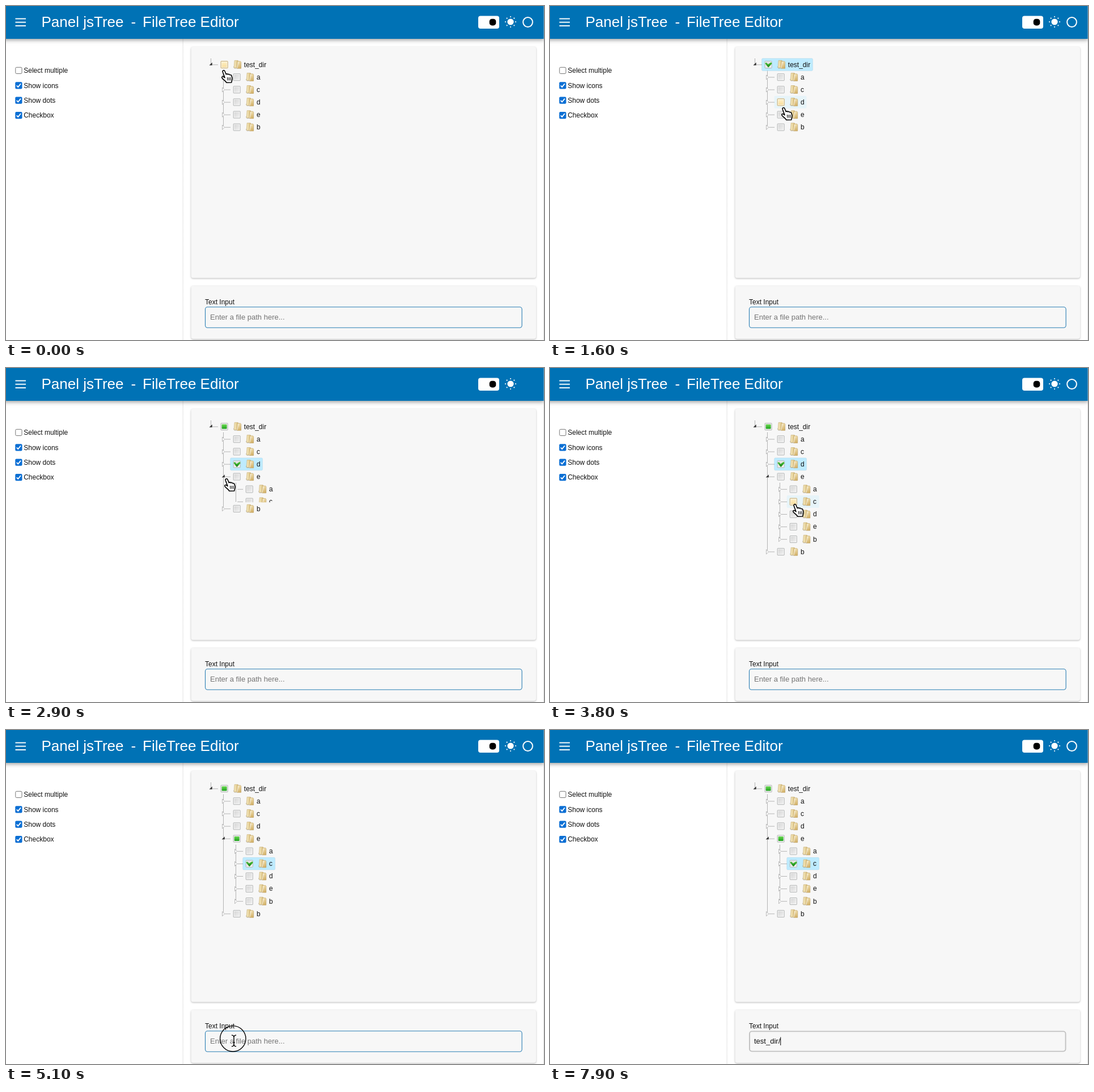
These frames come from a looping animation (949x590 px, 8000 ms). An HTML page with a canvas:

```html
<!DOCTYPE html>
<html lang="en">
<head>
<meta charset="utf-8">
<title>Panel jsTree - FileTree Editor</title>
<style>
html, body { margin: 0; width: 949px; height: 590px; overflow: hidden; background: #fff; }
canvas { display: block; }
</style>
</head>
<body>
<canvas id="stage" width="949" height="590"></canvas>
<script>
const ctx = document.getElementById('stage').getContext('2d');
const LOOP = 8000, STEP = 100, ROW = 22.1;
const FONT = '"Liberation Sans", Arial, sans-serif';

// pointer way points: time, x, y of the cursor's middle
const PATH = [
  [0, 390, 124], [600, 390, 124], [900, 420, 196], [1100, 418, 190],
  [2000, 418, 190], [2400, 395, 206], [3200, 395, 206], [3600, 438, 251],
  [4200, 438, 251], [4500, 424, 485], [4800, 402, 549], [5700, 402, 549]
];
const CLICKS = [300, 1700, 2600, 3900];
const BUSY = [[500, 700], [1800, 2100], [2800, 3200], [4000, 4300], [5200, 5400]];
const KEYS = [5700, 5900, 6100, 6300, 6800, 7100, 7300, 7500, 7700];
const TYPED = 'test_dir/';
const FOCUS = 5200, OPEN = 2800;

const HAND = new Path2D('M2.2 4.2C1.6 1.6 4.8.7 5.9 3L8.3 8.7C9 7.4 11 7.6 11.5 9C12.5 7.9 14.2 8.4 14.7 9.8' +
  'C15.9 9 17.5 9.8 17.9 11.2L19 15C19.6 18 18.3 20 17.6 23L9 23.3C7.5 20.6 3.2 17.8 1.2 15.2C-.1 13.2 2 11.7 3.7 13L6 14.7Z');
const ARROW = new Path2D('M0 0V16.5L3.9 12.9L6.4 18.8L9 17.7L6.5 11.9H11.8Z');

function text(s, x, y, size, color) {
  ctx.font = size + 'px ' + FONT;
  ctx.fillStyle = color;
  ctx.fillText(s, x, y);
}

function box(x, y, w, h, r, fill, stroke, lw = 1) {
  ctx.beginPath();
  ctx.roundRect(x, y, w, h, r);
  if (fill) { ctx.fillStyle = fill; ctx.fill(); }
  if (stroke) { ctx.strokeStyle = stroke; ctx.lineWidth = lw; ctx.stroke(); }
}

function line(points, color, lw) {
  ctx.beginPath();
  points.forEach(([x, y]) => ctx.lineTo(x, y));
  ctx.strokeStyle = color;
  ctx.lineWidth = lw;
  ctx.stroke();
}

function circle(x, y, r, color, lw) {
  ctx.beginPath();
  ctx.arc(x, y, r, 0, 2 * Math.PI);
  if (lw) { ctx.strokeStyle = color; ctx.lineWidth = lw; ctx.stroke(); }
  else { ctx.fillStyle = color; ctx.fill(); }
}

function dots(x1, y1, x2, y2) {
  ctx.setLineDash([1, 1]);
  line([[x1, y1], [x2, y2]], '#707070', 1);
  ctx.setLineDash([]);
}

function fade(x1, y1, x2, y2, a, b) {
  const g = ctx.createLinearGradient(x1, y1, x2, y2);
  g.addColorStop(0, a);
  g.addColorStop(1, b);
  return g;
}

function shadowed(color, blur, dy, draw) {
  ctx.save();
  ctx.shadowColor = color;
  ctx.shadowBlur = blur;
  ctx.shadowOffsetY = dy;
  draw();
  ctx.restore();
}

function header(t) {
  shadowed('rgba(0,0,0,.4)', 7, 2, () => box(-10, -10, 958.5, 68, 0, '#0072b5'));
  for (const y of [22.5, 28.7, 35]) line([[16.5, y], [35, y]], '#fff', 1.9);
  text('Panel jsTree', 62.5, 37, 26, '#fff');
  text('-', 220.5, 37, 26, '#fff');
  text('FileTree Editor', 241, 37, 26, '#fff');
  box(833, 17.5, 37, 22.5, 4, '#fff');
  box(852.7, 22.8, 11.6, 11.6, 4.5, '#000');
  circle(890, 28, 5.6, '#fff');
  for (let i = 0; i < 8; i++) {
    const a = i * Math.PI / 4;
    circle(890 + 9 * Math.cos(a), 28 + 9 * Math.sin(a), 1.1, '#fff');
  }
  const busy = BUSY.some(([a, b]) => t >= a && t < b) || KEYS.some(k => t >= k && t < k + 100);
  if (!busy) circle(920.5, 28.5, 8.4, '#fff', 2);
}

function sidebar() {
  ctx.fillStyle = fade(310, 0, 314, 0, '#fff', '#e3e3e3');
  ctx.fillRect(311, 58, 2, 532);
  ['Select multiple', 'Show icons', 'Show dots', 'Checkbox'].forEach((s, i) => {
    const y = 113.8 + i * 26.4;
    if (i) {
      box(16.3, y - 6, 12.2, 12.2, 2, '#0b6fd4');
      line([[18.8, y + .3], [21.3, y + 2.9], [26, y - 3]], '#fff', 1.8);
    } else box(16.8, y - 5.5, 11.2, 11.2, 2, '#fff', '#767676');
    text(s, 31.2, y + 4.3, 12, '#111');
  });
}

function card(y, h) {
  shadowed('rgba(0,0,0,.28)', 3, 1, () => box(326.5, y, 608.5, h, 4, '#f7f7f7'));
}

function checkbox(x, y, state, hover) {
  const edge = hover ? '#c8a75e' : '#aeb0b0';
  const fill = hover ? fade(x, y - 6, x, y + 6, '#fff3cd', '#f8dc98')
    : fade(x - 6, y - 6, x + 6, y + 6, '#d2d2d2', '#f3f3f3');
  box(x - 6, y - 5.7, 12, 12, .5, '#fafafa', edge);
  box(x - 4.5, y - 4.2, 9, 9, 0, fill);
  if (state === 'part') {
    box(x - 4.5, y - 3.7, 9, 8, 1, fade(x, y - 4, x, y + 5, '#6fdc55', '#159a17'));
  } else if (state === 'on') {
    ctx.beginPath();
    [[-6, -2], [-3.5, -3.5], [-.5, -.2], [5, -4], [6.5, -1.5], [0, 5.3]].forEach(([a, b]) => ctx.lineTo(x + a, y + b));
    ctx.closePath();
    ctx.fillStyle = fade(x, y - 4, x, y + 5, '#52c840', '#11800f');
    ctx.fill();
  }
}

function poly(points, fill, stroke) {
  ctx.beginPath();
  points.forEach(([x, y]) => ctx.lineTo(x, y));
  ctx.closePath();
  if (fill) { ctx.fillStyle = fill; ctx.fill(); }
  if (stroke) { ctx.strokeStyle = stroke; ctx.lineWidth = .6; ctx.stroke(); }
}

function folder(x, y) {
  const at = pts => pts.map(([a, b]) => [x + a, y + b]);
  poly(at([[-7.5, 4], [-4, 2], [2, 7], [-5, 7.5]]), 'rgba(90,90,90,.28)');
  poly(at([[-5, -7], [1, -7], [2, -5], [2, 6], [-6, 6]]), fade(x - 6, y, x + 2, y, '#f7ecc5', '#d9bd78'), '#c3a667');
  poly(at([[0, -5.5], [5.5, -5.5], [6.5, -4], [6.5, 7], [-.5, 7]]), fade(x, y - 6, x + 7, y + 7, '#f8eac0', '#cda95c'), '#b99957');
  line(at([[-.3, 6.5], [1.8, -4.5]]), 'rgba(255,255,255,.75)', 1);
}

function toggler(x, y, kind) {
  dots(x + 3, y + .5, x + 12, y + .5);
  if (kind === 'open') poly([[x - 3, y + 1.5], [x + 2.2, y + 1.5], [x + 2.2, y - 3.5]], '#333');
  if (kind === 'shut') poly([[x - 2, y - 3.5], [x + 2, y + .5], [x - 2, y + 4.5]], '#fff', '#888');
}

function node(label, depth, y, o) {
  const x = 361.5 + depth * ROW;
  const w = depth ? 57 : 90, left = x + 12;
  if (o.selected) box(left, y - 10.8, w, 22, 2, '#beebff', 'rgba(120,170,190,.25)', .7);
  else if (o.hover) box(left, y - 10.8, w, 22, 2, `rgba(231,244,249,${o.hover})`);
  toggler(x, y, o.arrow);
  checkbox(x + 23.6, y, o.selected ? 'on' : o.part ? 'part' : '', o.near);
  folder(x + 46.6, y);
  text(label, x + 58.3, y + 4.3, 12, '#111');
}

function tree(t, hot) {
  const p = Math.max(0, Math.min(1, (t - OPEN) / 265));
  const grown = 5 * ROW * (.5 - .5 * Math.cos(Math.PI * p));
  const picked = t >= 4000 ? 'e/c' : t >= 1800 ? 'd' : t >= 400 ? '/' : '';
  const top = i => 103.3 + i * ROW;
  const last = top(5) + grown;

  dots(361.5, 93, 361.5, 102);
  dots(383.5, 114, 383.5, last);

  const put = (key, label, depth, y, extra) => {
    const left = 373.5 + depth * ROW;
    const near = hot && hot.x >= left && hot.x < left + (depth ? 57 : 90) && Math.abs(hot.y - y) < 11;
    const hover = near ? (key === '/' ? Math.min(1, t / 150) : 1) : 0;
    node(label, depth, y, Object.assign({ selected: picked === key, near, hover, arrow: 'shut' }, extra));
  };

  put('/', 'test_dir', 0, top(0), { arrow: 'open', part: picked.length && picked !== '/' });
  ['a', 'c', 'd', 'e'].forEach((s, i) => put(s, s, 1, top(i + 1),
    s === 'e' ? { arrow: t >= OPEN ? 'open' : 'shut', part: picked === 'e/c' } : {}));
  if (grown > 0) {
    ctx.save();
    ctx.beginPath();
    ctx.rect(327, 202.8, 600, grown);
    ctx.clip();
    dots(405.5, 203, 405.5, Math.min(top(9), 236.5 + grown - 35));
    ['a', 'c', 'd', 'e', 'b'].forEach((s, i) => put('e/' + s, s, 2, top(i + 5), { arrow: p < 1 ? '' : 'shut' }));
    ctx.restore();
  }
  put('b', 'b', 1, last);
}

function input(t) {
  text('Text Input', 351, 527, 12, '#111');
  const focused = t >= FOCUS;
  if (focused) box(352, 532.4, 557.5, 35.2, 4, '#f7f7f7', '#c1c1c1', 1.9);
  else box(351.5, 531.8, 558.6, 36.4, 4, '#f7f7f7', '#2b7fb5', 1.1);
  const typed = TYPED.slice(0, KEYS.filter(k => t >= k).length);
  if (typed) text(typed, 360, 554.3, 13, '#111');
  else text('Enter a file path here...', 360, 554.3, 13, '#757575');
  if (!focused) return;
  const since = t - Math.max(FOCUS, ...KEYS.filter(k => t >= k));
  if (since % 1000 < 500) {
    ctx.font = '13px ' + FONT;
    const x = 360.5 + ctx.measureText(typed).width;
    line([[x, 542.5], [x, 557]], '#000', 1);
  }
}

function pointerAt(t) {
  const i = PATH.findIndex(p => p[0] > t);
  if (i < 0) return null;
  const [a, b] = [PATH[i - 1], PATH[i]];
  const k = (t - a[0]) / (b[0] - a[0]);
  const e = k * k * (3 - 2 * k);
  return { x: a[1] + (b[1] - a[1]) * e, y: a[2] + (b[2] - a[2]) * e };
}

function shape(path, x, y) {
  ctx.save();
  ctx.translate(x, y);
  ctx.lineJoin = 'round';
  shadowed('rgba(0,0,0,.3)', 2, 1, () => { ctx.fillStyle = '#fff'; ctx.fill(path); });
  ctx.strokeStyle = '#000';
  ctx.lineWidth = 1.6;
  ctx.stroke(path);
  ctx.restore();
}

function pointer(t, m, hot) {
  if (hot.y > 520) {
    for (const [c, w] of [['rgba(255,255,255,.85)', 3.4], ['#000', 1.5]]) {
      line([[m.x, m.y - 8], [m.x, m.y + 8]], c, w);
      for (const s of [-1, 1]) line([[m.x - 4, m.y + s * 10], [m.x - 1.5, m.y + s * 9.4], [m.x, m.y + s * 7.5],
        [m.x + 1.5, m.y + s * 9.4], [m.x + 4, m.y + s * 10]], c, w);
      line([[m.x - 2, m.y + 3], [m.x + 2, m.y + 3]], c, w * .8);
    }
  } else if (hot.y < 340) {
    shape(HAND, m.x - 10, m.y - 12);
    for (let i = 0; i < 3; i++) {
      const x = m.x + 1 + i * 2.7;
      line([[x - .6, m.y + 2], [x, m.y + 7.5]], '#000', 1.1);
    }
  } else shape(ARROW, hot.x, hot.y + 5);

  for (const c of CLICKS) {
    const d = t - c;
    if (d >= 0 && d < 100) circle(hot.x, hot.y, 23, '#000', 1.4);
    else if (d >= 100 && d < 200) circle(hot.x, hot.y, 45, 'rgba(0,0,0,.3)', 1.2);
  }
  if (t >= 5100 && t < 5200) circle(m.x - 1.7, m.y - 3.7, 22.7, '#000', 1.4);
}

function draw(t) {
  ctx.fillStyle = '#fff';
  ctx.fillRect(0, 0, 949, 590);
  sidebar();
  card(72, 408.5);
  card(494.5, 93.5);
  line([[948.5, 58], [948.5, 590]], '#dedede', 1);
  header(t);
  const m = pointerAt(t);
  const hot = m && { x: m.x - 5, y: m.y - 17 };
  tree(t, hot);
  input(t);
  if (m) pointer(t, m, hot);
}

const start = performance.now();
function tick() {
  const t = (performance.now() - start) % LOOP;
  draw(Math.floor(t / STEP) * STEP);
  requestAnimationFrame(tick);
}
tick();
</script>
</body>
</html>
```
